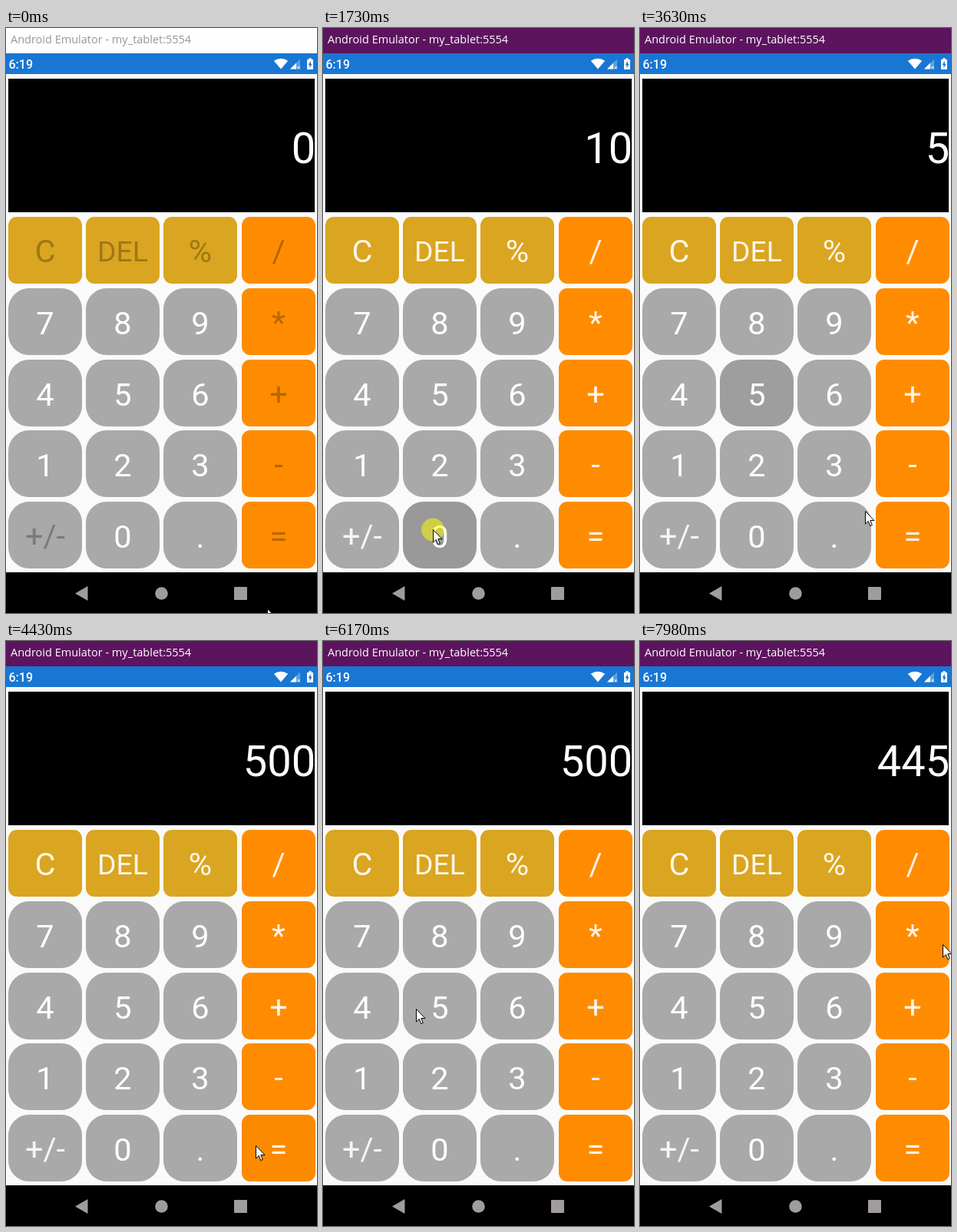
Write an HTML page that moves like this. It is 405 px wide and 762 px high and loops after 8000 ms.

```html
<!DOCTYPE html>
<html lang="en">
<head>
<meta charset="utf-8">
<title>Calculator</title>
<style>
html, body { margin: 0; width: 100%; height: 100%; overflow: hidden; }
svg { display: block; width: 405px; height: 762px; }
text { font-family: Roboto, sans-serif; }
#title { font: 14.5px "Open Sans", sans-serif; }
</style>
</head>
<body>
<svg id="stage" viewBox="0 0 405 762">
  <rect width="405" height="762" fill="#fafafa"/>
  <rect id="bar" width="405" height="33"/>
  <text id="title" x="6" y="20">Android Emulator - my_tablet:5554</text>

  <rect y="33" width="405" height="27" fill="#1976d2"/>
  <text x="3.5" y="53" font-size="16" font-weight="500" fill="#fff">6:19</text>
  <g fill="#fff">
    <path d="M358 53.5L348.8 42.8Q358 36.6 367.2 42.8Z"/>
    <path d="M370 53.5H383V40.5Z" opacity=".3"/>
    <path d="M370 53.5H378V45.5Z"/>
    <path d="M379.5 50L383 53.5M383 50L379.5 53.5" stroke="#fff"/>
    <path d="M392 41H394.3V39.3H397.7V41H400V54H392Z"/>
    <path d="M396.8 42.8L393.6 48.3H395.5V52.3L398.6 46.8H396.8Z" fill="#1976d2"/>
  </g>

  <rect x="3" y="66" width="399" height="174"/>
  <text id="display" x="403.2" y="175.5" font-size="56" text-anchor="end" fill="#fff"></text>
  <g id="keys"></g>

  <rect y="709" width="405" height="53"/>
  <g fill="#a19c9c">
    <path d="M90 736.5L106.5 727V746Z"/>
    <circle cx="202.5" cy="736.5" r="8.3"/>
    <rect x="297" y="728" width="17" height="17" rx="1"/>
  </g>

  <circle id="halo" r="15" fill="#ff0" opacity=".52"/>
  <path id="cursor" d="M.5 .5V17L4.3 13.4L6.8 19.6L9.3 18.5L6.8 12.5H12Z" fill="#fff" stroke="#000"/>
</svg>
<script>
const LOOP = 8000;
const FOCUS = 610;     // the window becomes active
const RELEASE = 160;   // from pointer down to pointer up
const TRAVEL = 620;    // longest pointer move
const $ = id => document.getElementById(id);
const clamp = v => Math.max(0, Math.min(1, v));

function add(parent, tag, attrs) {
  const el = document.createElementNS("http://www.w3.org/2000/svg", tag);
  for (const k in attrs) el.setAttribute(k, attrs[k]);
  return parent.appendChild(el);
}

const shades = {};   // dark overlay of each key
const dimmed = [];   // labels that brighten with focus

["C DEL % /", "7 8 9 *", "4 5 6 +", "1 2 3 -", "+/- 0 . ="].forEach((row, r) => {
  row.split(" ").forEach((name, c) => {
    const x = Math.floor(3 + c * 101.34), y = Math.round(246 + r * 92.8);
    const grey = c < 3 && r > 0;
    const plain = grey && name !== "+/-";
    const box = { x, y, width: 96, height: 87, rx: grey ? 27 : 11 };
    const fill = grey ? "#a9a9a9" : c === 3 ? "#ff8c00" : "#daa520";
    add($("keys"), "rect", { ...box, fill });
    shades[name] = add($("keys"), "rect", box);
    const label = add($("keys"), "text", {
      x: x + 48, y: y + (name === "DEL" ? 57.5 : plain ? 60 : 59.4),
      "font-size": name === "DEL" ? 37.3 : 41.5, "text-anchor": "middle", fill: "#fff"
    });
    label.textContent = name;
    if (!plain) dimmed.push(label);
  });
});

// Pointer stops; "taps" holds the times at which the key is pressed there.
const stop = (arrive, x, y, key, ...taps) => ({ arrive, x, y, key, taps });
const stops = [
  stop(50, 340, 756),
  stop(450, 62, 585, "1", 770),
  stop(1410, 143, 653, "0", 1410, 1730),
  stop(2350, 358, 394, "*", 2450),
  stop(2830, 202, 493),
  stop(3230, 154, 507, "5", 3230),
  stop(3950, 325, 657, "=", 3950),
  stop(5130, 342, 553, "-", 5130),
  stop(6010, 99, 481),
  stop(6170, 121, 479, "5", 6250, 6570),
  stop(7340, 360, 646, "=", 7345),
  stop(7820, 363, 488),
  stop(7980, 394, 395)
];
const taps = stops.flatMap(s => s.taps.map(at => ({ key: s.key, at })));

// The screen refreshes every 80 ms, with a slowly drifting phase.
function tick(t) {
  const phase = t < 2700 ? 50 : t < 4700 ? 30 : t < 6500 ? 10 : -20;
  return Math.max(0, Math.floor((t - phase) / 80) * 80 + phase);
}

function pointer(t) {
  const i = stops.findIndex(s => s.arrive > t);
  if (i < 0) return stops[stops.length - 1];
  const b = stops[i], a = stops[i - 1] || b;
  const free = a.taps.length ? a.taps[a.taps.length - 1] + RELEASE : a.arrive;
  const start = Math.max(free, b.arrive - TRAVEL);
  const e = 1 - (1 - clamp((t - start) / (b.arrive - start))) ** 3;
  return { x: Math.round(a.x + (b.x - a.x) * e), y: Math.round(a.y + (b.y - a.y) * e) };
}

const apply = {
  "*": (a, b) => a * b,
  "-": (a, b) => a - b
};

function reading(t) {
  let shown = "0", fresh = true, held = 0, op = null;
  for (const { key, at } of taps) {
    if (at + RELEASE > t) break;
    if (key >= "0" && key <= "9") {
      shown = fresh ? key : shown + key;
      fresh = false;
      continue;
    }
    if (key === "=") shown = String(apply[op](held, +shown));
    else [held, op] = [+shown, key];
    fresh = true;
  }
  return shown;
}

function shade(key, t) {
  const levels = taps.filter(p => p.key === key && t >= p.at + RELEASE)
    .map(p => clamp((p.at + 500 - t) / 140));
  return .095 * Math.max(0, ...levels);
}

function draw(now) {
  const t = tick(now);
  const focus = t >= FOCUS;
  $("bar").setAttribute("fill", focus ? "#5c145e" : "#fefefe");
  $("title").setAttribute("fill", focus ? "#fff" : "#969696");
  for (const label of dimmed) {
    label.setAttribute("fill", focus ? "#fff" : "#000");
    label.setAttribute("opacity", focus ? .9 : .27);
  }
  $("display").textContent = reading(t);
  for (const key in shades) shades[key].setAttribute("opacity", shade(key, t));

  const { x, y } = pointer(t);
  const down = taps.some(p => t >= p.at && t < p.at + RELEASE);
  $("cursor").setAttribute("transform", `translate(${x} ${y})`);
  $("halo").setAttribute("transform", `translate(${x} ${y + .5})`);
  $("halo").setAttribute("visibility", down ? "visible" : "hidden");
}

const begin = performance.now();
function loop() {
  draw((performance.now() - begin) % LOOP);
  requestAnimationFrame(loop);
}
loop();
</script>
</body>
</html>
```
